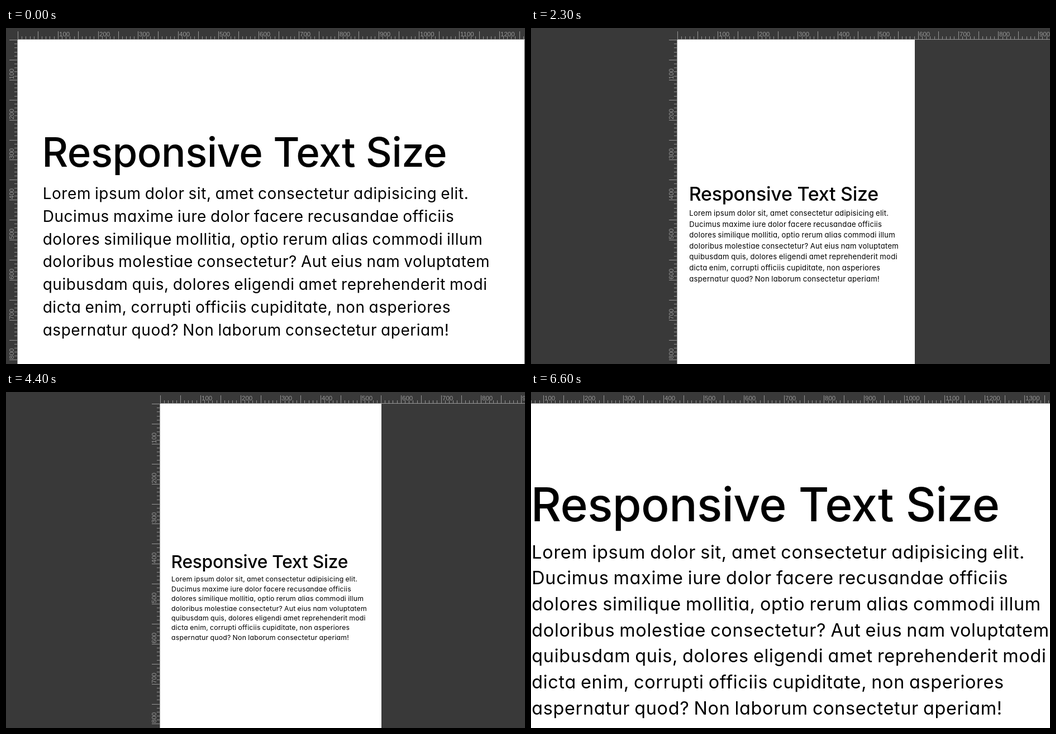
An HTML page for the animation above (6700 ms loop, 929 px wide and 603 px high).

```html
<!DOCTYPE html>
<html lang="en">
<head>
<meta charset="utf-8">
<title>Responsive Text Size</title>
<style>
  html, body { margin: 0; width: 100%; height: 100%; overflow: hidden; background: #393939; }
  svg { display: block; width: 929px; height: 603px; }
  .copy { font-family: Inter, "Open Sans", sans-serif; font-feature-settings: "cv11"; font-optical-sizing: none; }
  #title { font-weight: 550; letter-spacing: -.007em; }
  #body { font-weight: 400; letter-spacing: .02em; word-spacing: -.05em; }
  .ruler { fill: #969696; font: 11.5px "Liberation Sans", Arial, sans-serif; }
  .ruler rect { shape-rendering: crispEdges; }
</style>
</head>
<body>
<svg viewBox="0 0 929 603">
  <rect width="929" height="603" fill="#393939"/>
  <rect id="page" y="21" height="582" fill="#fff"/>
  <g class="copy">
    <text id="title">Responsive Text Size</text>
    <g id="body"></g>
  </g>
  <rect width="929" height="21" fill="#393939"/>
  <g id="ruler" class="ruler"></g>
</svg>
<script>
const LOOP = 6700, STEP = 100, CENTER = 475, TOP = 21, UNIT = 0.718;
const REFLOW_DELAY = 42; // line spacing trails the page width while it is dragged
const LINES = [
  "Lorem ipsum dolor sit, amet consectetur adipisicing elit.",
  "Ducimus maxime iure dolor facere recusandae officiis",
  "dolores similique mollitia, optio rerum alias commodi illum",
  "doloribus molestiae consectetur? Aut eius nam voluptatem",
  "quibusdam quis, dolores eligendi amet reprehenderit modi",
  "dicta enim, corrupti officiis cupiditate, non asperiores",
  "aspernatur quod? Non laborum consectetur aperiam!"
];
// The drag: time and left edge of the page
const DRAG = [
  [300, 21.7], [1600, 180.2], [2400, 274.5], [3000, 320], [3700, 349.5],
  [4500, 266.5], [5000, 186], [6000, 30], [6600, -49.5]
];

const byId = id => document.getElementById(id);
const page = byId("page"), title = byId("title"), body = byId("body"), ruler = byId("ruler");

function set(node, attrs) {
  for (const name in attrs) node.setAttribute(name, attrs[name]);
}

function add(parent, tag, attrs, text = "") {
  const node = document.createElementNS("http://www.w3.org/2000/svg", tag);
  set(node, attrs);
  node.textContent = text;
  return parent.appendChild(node);
}

const lines = LINES.map(line => add(body, "text", {}, line));

function buildRuler() {
  add(ruler, "rect", { x: 0, y: TOP - 1, width: 1100, height: 1 });
  add(ruler, "rect", { x: -1, y: TOP, width: 1, height: 582 });
  for (let mark = 0; mark <= 1400; mark += 10) {
    const at = Math.round(mark * UNIT), major = mark % 50 === 0;
    const labelled = mark > 0 && mark % 100 === 0;
    const topLength = major ? 14 : 5, sideLength = major ? 15 : 6;
    add(ruler, "rect", { x: at, y: TOP - 1 - topLength, width: 1, height: topLength });
    if (labelled) add(ruler, "text", { x: at + 2, y: 14.5 }, mark);
    if (mark > 810) continue;
    add(ruler, "rect", { x: -sideLength, y: TOP + at, width: sideLength, height: 1 });
    if (labelled) add(ruler, "text", { transform: `translate(-7 ${TOP + at - 1}) rotate(-90)` }, mark);
  }
}

function leftAt(time) {
  const next = DRAG.findIndex(([at]) => at > time);
  if (next === 0) return DRAG[0][1];
  if (next < 0) return DRAG[DRAG.length - 1][1];
  const [t0, x0] = DRAG[next - 1], [t1, x1] = DRAG[next];
  return x0 + (x1 - x0) * (time - t0) / (t1 - t0);
}

const widthAt = time => 2 * (CENTER - leftAt(time));

function draw(time) {
  const left = leftAt(time), width = widthAt(time), flow = widthAt(time - REFLOW_DELAY);
  const inset = left + width * 0.05, edge = Math.floor(left);
  const titleSize = width * 0.08, bodySize = width * 0.0309;
  set(page, { x: edge, width: Math.round(width) });
  set(title, { x: inset - titleSize * 0.037, y: 366 - flow * 0.129, "font-size": titleSize });
  set(body, { "font-size": bodySize });
  lines.forEach((line, i) => set(line, {
    x: inset - bodySize * 0.05,
    y: 365 - flow * 0.064 + i * flow * 0.045
  }));
  set(ruler, { transform: `translate(${edge} 0)` });
}

function tick() {
  const time = (performance.now() - start) % LOOP;
  draw(Math.floor(time / STEP) * STEP);
  requestAnimationFrame(tick);
}

buildRuler();
const start = performance.now();
tick();
</script>
</body>
</html>
```
